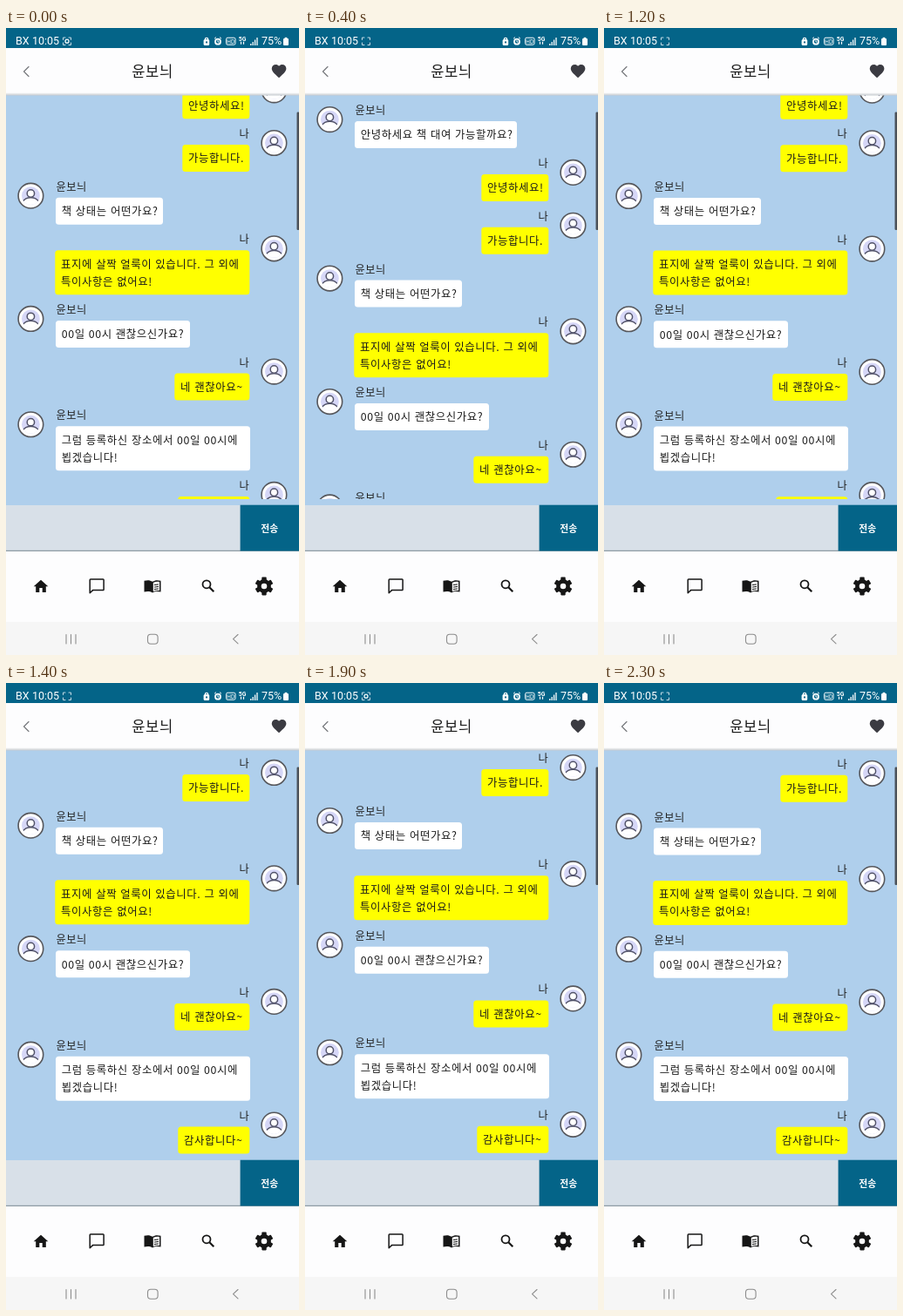
These frames come from a looping animation (336x720 px, 2.9 s). An HTML page:

```html
<!DOCTYPE html>
<html lang="ko">
<head>
<meta charset="utf-8">
<title>Chat</title>
<style>
  html, body { margin: 0; width: 100%; height: 100%; overflow: hidden; background: #fdfdfe; }
  svg { display: block; width: 100vw; height: 100vh; }
  text { font-family: 'Noto Sans CJK KR', 'Noto Sans CJK JP', 'Noto Sans CJK', sans-serif; fill: #1a1a1a; }
  .bar text { font-family: Roboto, sans-serif; font-size: 12.5px; fill: #fff; }
  .msg { font-size: 12.4px; letter-spacing: .6px; }
  .who { font-size: 12.2px; letter-spacing: .5px; fill: #222; }
  .line { fill: none; stroke-linecap: round; stroke-linejoin: round; }
</style>
</head>
<body>
<svg viewBox="0 0 336 720">
  <defs>
    <clipPath id="view"><rect y="77" width="336" height="464"/></clipPath>
    <clipPath id="face"><circle r="10.4"/></clipPath>
    <linearGradient id="edge" x2="0" y2="1">
      <stop stop-color="#f4f5f6"/><stop offset="1" stop-color="#c6cbd0"/>
    </linearGradient>
    <g id="avatar">
      <circle r="14.3" fill="#fff" stroke="#56575c" stroke-width="1.6"/>
      <circle r="10.4" fill="#d6d7f7"/>
      <g clip-path="url(#face)" fill="#fff" stroke="#52536a" stroke-width="1.5">
        <path d="M-9.5 12V7C-7 3.400-3.500 2.200 0 2.200S7 3.400 9.500 7V12"/>
        <circle cy="-2.6" r="4.2"/>
      </g>
    </g>
  </defs>

  <rect width="336" height="720" fill="#fdfdfe"/>
  <rect y="77" width="336" height="471" fill="#afcfec"/>
  <g id="chat" clip-path="url(#view)"></g>
  <rect y="74.500" width="336" height="3" fill="url(#edge)"/>
  <rect x="333.5" y="96.5" width="3" height="135.5" rx="1.2" fill="#4b5158"/>

  <g class="bar">
    <rect width="336" height="23" fill="#046488"/>
    <text x="11" y="19.2">BX</text>
    <text x="30" y="19.2">10:05</text>
    <path class="line" stroke="#c4dbe4" d="M68 11h-2.500v2.500M72 11h2.500v2.500M65.500 17v2.500H68M74.500 17v2.500H72"/>
    <circle id="dot" cx="70" cy="15.2" r="2" fill="none" stroke="#fff" stroke-width="1.2"/>
    <rect x="226.6" y="13" width="6.6" height="7" rx="1.5" fill="#fff"/>
    <path class="line" stroke="#fff" stroke-width="1.2" d="M228.300 13a1.700 1.700 0 0 1 3.400 0"/>
    <circle cx="230" cy="16.4" r="1.1" fill="#046488"/>
    <circle cx="243" cy="15.7" r="3" fill="none" stroke="#fff" stroke-width="1.8"/>
    <path class="line" stroke="#fff" d="M239.300 12l1.400-1.200M246.700 12l-1.400-1.200M243 14.500v1.500h1"/>
    <rect x="252.6" y="11.2" width="10.4" height="8" rx="1.5" fill="none" stroke="#fff"/>
    <text x="257.8" y="17.6" text-anchor="middle" style="font-size:6.5px">HD</text>
    <text x="271" y="14.7" text-anchor="middle" style="font-size:6.8px;font-weight:700">5G</text>
    <path stroke="#fff" stroke-width="1.2" d="M269.500 15.700v3M272.500 15.700v3"/>
    <path stroke="#fff" stroke-width="1.3" d="M280.800 20v-2M283.200 20v-4M285.600 20v-6.500M288 20v-9"/>
    <text x="293" y="19.2">75%</text>
    <rect x="318" y="12" width="6" height="8" rx="1" fill="#fff"/>
    <rect x="319.6" y="10.8" width="2.8" height="2" fill="#fff"/>
  </g>

  <path class="line" stroke="#77797d" stroke-width="1.2" d="M26 44.500l-5.500 5.500 5.500 5.500"/>
  <text id="title" x="168" y="56" text-anchor="middle" font-size="16.6" font-weight="500" letter-spacing=".6"></text>
  <path transform="translate(303.100 39.500) scale(.83)" fill="#3b3b42"
    d="M12 21.300C5.400 15.400 2 12.300 2 8.500 2 5.400 4.400 3 7.500 3c1.700 0 3.400.8 4.500 2.100C13.100 3.800 14.800 3 16.500 3 19.600 3 22 5.400 22 8.500c0 3.800-3.400 6.900-10 12.800z"/>

  <rect y="548" width="336" height="52" fill="#d8e0e8"/>
  <rect y="599.8" width="336" height="1" fill="#76858e"/>
  <rect x="268.6" y="547.7" width="67.4" height="52.8" fill="#046488"/>
  <text x="302.300" y="579" text-anchor="middle" font-size="10.8" font-weight="700" style="fill:#fff">전송</text>

  <g fill="#161616">
    <path d="M38.300 648v-5h3.400v5h4.100v-6.700h2.500L40 633.800l-8.300 7.500h2.500v6.700z"/>
    <path class="line" stroke="#161616" stroke-width="1.5" d="M97 633h14.300a.8.800 0 0 1 .8.800v11a.8.800 0 0 1-.8.800H99.500l-3.300 3.200v-15a.8.800 0 0 1 .8-.8z"/>
    <path d="M168 635.800c-2.800-2-6-2-9.500-1v12.700c3.500-.9 6.700-.8 9.500 1 2.800-1.800 6-1.900 9.500-1v-12.700c-3.500-1-6.700-1-9.500 1z"/>
    <path fill="#fff" d="M168.800 637c2.300-1.200 4.600-1.400 7.200-.9v10c-2.600-.4-4.900-.2-7.200.9z"/>
    <path class="line" stroke="#161616" stroke-width="1.2" d="M170.500 639.500l4-.5M170.500 642l4-.5M170.500 644.500l4-.5"/>
    <circle cx="230" cy="638.8" r="4.5" fill="none" stroke="#161616" stroke-width="1.8"/>
    <path stroke="#161616" stroke-width="2.2" d="M233.300 642.200l5 5"/>
    <g id="gear" transform="translate(296 641)">
      <circle r="5.6" fill="none" stroke="#161616" stroke-width="4.6"/>
    </g>
  </g>

  <rect y="682" width="336" height="38" fill="#f6f6f6"/>
  <g class="line" stroke="#8d8d8d" stroke-width="1.1">
    <path d="M69 696.500v10.500M74.500 696.500v10.500M80 696.500v10.500"/>
    <rect x="162.5" y="696.2" width="11.6" height="11" rx="3.5"/>
    <path d="M266 696.500l-5.500 5.200 5.500 5.200"/>
  </g>
</svg>
<script>
const LOOP = 2900, PITCH = 60.65, LINE = 20;
const TOP = 77, BOTTOM = 541, END = 122.5;
const PARTNER = '윤보늬', ME = '나';

// [mine, bubble width, ...lines]
const messages = [
  [0, 186, '안녕하세요 책 대여 가능할까요?'],
  [1, 77, '안녕하세요!'],
  [1, 77, '가능합니다.'],
  [0, 123, '책 상태는 어떤가요?'],
  [1, 223, '표지에 살짝 얼룩이 있습니다. 그 외에', '특이사항은 없어요!'],
  [0, 154, '00일 00시 괜찮으신가요?'],
  [1, 86, '네 괜찮아요~'],
  [0, 223, '그럼 등록하신 장소에서 00일 00시에', '뵙겠습니다!'],
  [1, 82, '감사합니다~'],
];

// [start ms, scroll, overscroll stretch]
const steps = [
  [0, 94.3, 0], [100, 62, 0], [200, 28, 0], [300, 6, 0],
  [400, 0, .0035], [500, 0, .002], [600, 0, 0],
  [1100, 45, 0], [1200, 94, 0], [1300, 118, 0],
  [1400, END, .0035], [1500, END, .022], [1700, END, .025], [1900, END, .028],
  [2000, END, .02], [2100, END, .01], [2200, END, .003], [2300, END, 0],
];
const dotOn = [[0, 100], [600, 1200], [1700, 2300]];

const $ = id => document.getElementById(id);

function add(parent, tag, attrs, text) {
  const el = document.createElementNS('http://www.w3.org/2000/svg', tag);
  for (const k in attrs) el.setAttribute(k, attrs[k]);
  if (text) el.textContent = text;
  parent.append(el);
  return el;
}

let nextY = 105;
const rows = messages.map(([mine, w, ...lines]) => {
  const g = add($('chat'), 'g', {});
  const extra = (lines.length - 1) * LINE;
  const x = mine ? 279.3 - w : 57;
  add(g, 'use', { href: '#avatar', x: mine ? 307.4 : 28.4 });
  add(g, 'text', { class: 'who', x: mine ? 279.3 : 57.6, y: -5.9, 'text-anchor': mine ? 'end' : 'start' },
    mine ? ME : PARTNER);
  add(g, 'rect', { x, y: 2, width: w, height: 31 + extra, rx: 3.5, fill: mine ? '#ffff00' : '#fff' });
  lines.forEach((s, i) => add(g, 'text', { class: 'msg', x: x + 6.8, y: 22.4 + i * LINE }, s));
  const row = { g, y: nextY };
  nextY += PITCH + extra;
  return row;
});

$('title').textContent = PARTNER;
for (let a = 0; a < 360; a += 60)
  add($('gear'), 'rect', { x: -2.7, y: -10.4, width: 5.4, height: 5, rx: .8, transform: `rotate(${a})` });

// Stretch grows with distance from the edge being pulled, then eases off.
const stretch = (d, k) => k * d * (1 - d / 966);

function draw(t) {
  const [, scroll, k] = steps.findLast(s => s[0] <= t);
  for (const { g, y } of rows) {
    const at = y - scroll;
    const pull = scroll ? -stretch(BOTTOM - at, k) : stretch(at - TOP, k);
    g.setAttribute('transform', `translate(0 ${(at + pull).toFixed(2)})`);
  }
  $('dot').style.opacity = dotOn.some(([a, b]) => t >= a && t < b) ? 1 : 0;
}

const start = performance.now();
function tick() {
  draw((performance.now() - start) % LOOP);
  requestAnimationFrame(tick);
}
tick();
</script>
</body>
</html>
```
